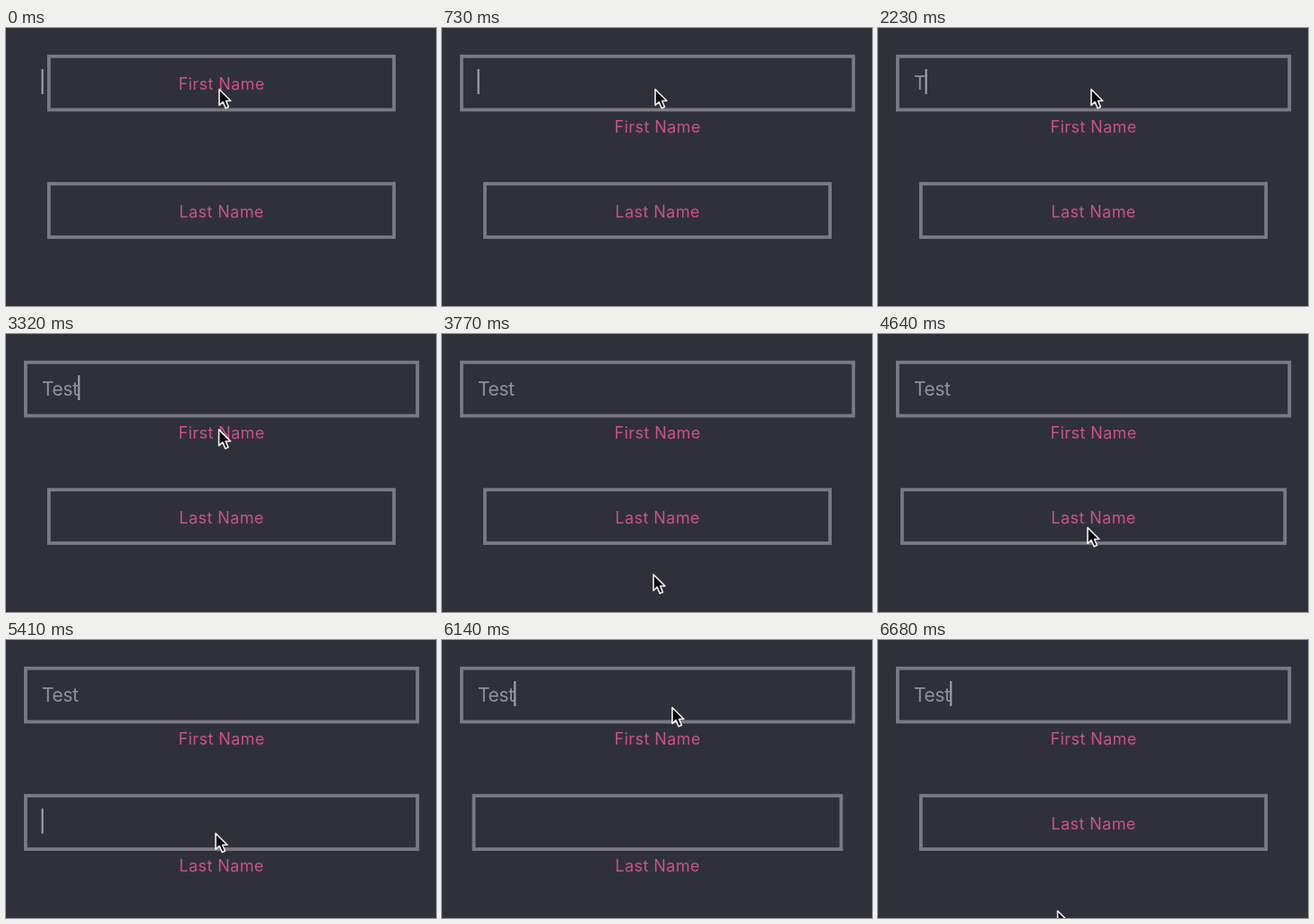
Animation, 480 px wide and 311 px high, one loop 6.72 s. Source, as an HTML page with a canvas:

```html
<!DOCTYPE html>
<html lang="en">
<head>
<meta charset="utf-8">
<title>Form focus</title>
<style>
  html, body { margin: 0; width: 100%; height: 100%; overflow: hidden; background: #2f313a; }
  canvas { display: block; }
</style>
</head>
<body>
<canvas id="stage" width="480" height="311"></canvas>
<script>
const ctx = document.getElementById('stage').getContext('2d');
const LOOP = 6720;
const FIELD = { height: 63.6, border: 3.8 };
const clamp = v => Math.max(0, Math.min(1, v));
const mix = (a, b, p) => a + (b - a) * p;
const smooth = p => p * p * (3 - 2 * p);
const ramp = (t, start, length) => clamp((t - start) / length);

// CSS "ease": cubic-bezier(.25, .1, .25, 1)
function ease(x) {
  let lo = 0, hi = 1, s = 0.5;
  for (let i = 0; i < 20; i++) {
    s = (lo + hi) / 2;
    const bx = 0.75 * s * (1 - s) + s * s * s;
    if (bx < x) lo = s; else hi = s;
  }
  return 0.3 * s * (1 - s) * (1 - s) + 3 * s * s * (1 - s) + s * s * s;
}

const moves = [
  { start: 3150, length: 610, x: 236, y: 268 },
  { start: 3820, length: 400, x: 234, y: 215.5 },
  { start: 5400, length: 420, x: 257, y: 74.5 },
  { start: 6200, length: 480, x: 200.5, y: 302 }
];

function pointerAt(t) {
  let x = 238, y = 67.5;
  for (const move of moves) {
    const p = smooth(ramp(t, move.start, move.length));
    x = mix(x, move.x, p);
    y = mix(y, move.y, p);
  }
  return [x, y];
}

// The box widens first, then the label drops below it.
function drawField(y, label, openAt, closeAt, t) {
  const phase = (delay, length) =>
    ease(ramp(t, openAt + delay, length)) - ease(ramp(t, closeAt + delay, length));
  const grow = phase(0, 200);
  const drop = phase(200, 300);
  const { height, border } = FIELD;
  const left = mix(46, 20, grow), right = mix(435, 461.2, grow);

  ctx.strokeStyle = '#797b84';
  ctx.lineWidth = border;
  ctx.strokeRect(left + border / 2, y + border / 2, right - left - border, height - border);

  ctx.font = '18px Inter, sans-serif';
  ctx.letterSpacing = '0.45px';
  ctx.textAlign = 'center';
  ctx.fillStyle = '#cb5189';
  ctx.fillText(label, 240.7, y + mix(39.3, 86.8, drop));
}

// Three quick keys, a pause, then the last one
function typedAt(t) {
  if (t < 2230) return '';
  const quick = Math.min(3, 1 + Math.floor((t - 2230) / 45));
  return 'Test'.slice(0, t < 2680 ? quick : 4);
}

// Solid for a moment, then fading out; blinks on while there is text.
function drawCaret(x, y, age, repeats) {
  if (age < 0) return;
  ctx.globalAlpha = 1 - ramp(repeats ? age % 1200 : age, 680, 90);
  ctx.fillStyle = '#a3a4a9';
  ctx.fillRect(x, y, 2.1, 28);
  ctx.globalAlpha = 1;
}

function drawEntry(t) {
  const text = typedAt(t);
  ctx.font = '21px Inter, sans-serif';
  ctx.letterSpacing = '-0.3px';
  ctx.textAlign = 'left';
  ctx.fillStyle = '#909298';
  ctx.fillText(text, 40, 69);

  const x = text ? 39.4 + ctx.measureText(text).width : 39.6;
  const inSecond = t >= 4540 && t < 6080;
  const lastAction = [6080, 2680, 2230, 50].find(at => t >= at);
  if (inSecond) drawCaret(39.6, 188.5, t - 4740, false);
  else drawCaret(x, 46, t - lastAction, text !== '');
}

function drawPointer(x, y) {
  ctx.save();
  ctx.translate(x, y);
  ctx.beginPath();
  [[0, 1], [0, 19], [4.2, 15.2], [7.2, 22.2], [10.5, 20.8], [7.6, 14], [13, 14]]
    .forEach(([px, py]) => ctx.lineTo(px, py));
  ctx.closePath();
  ctx.fillStyle = '#08090b';
  ctx.fill();
  ctx.strokeStyle = '#f2f2f3';
  ctx.lineWidth = 1.6;
  ctx.lineJoin = 'round';
  ctx.stroke();
  ctx.restore();
}

function draw(t) {
  ctx.fillStyle = '#2f313a';
  ctx.fillRect(0, 0, 480, 311);
  drawField(29.8, 'First Name', 40, Infinity, t);
  drawField(172.3, 'Last Name', 4540, 6080, t);
  drawEntry(t);
  drawPointer(...pointerAt(t));
}

const begin = performance.now();
function tick() {
  draw((performance.now() - begin) % LOOP);
  requestAnimationFrame(tick);
}
tick();
</script>
</body>
</html>
```
